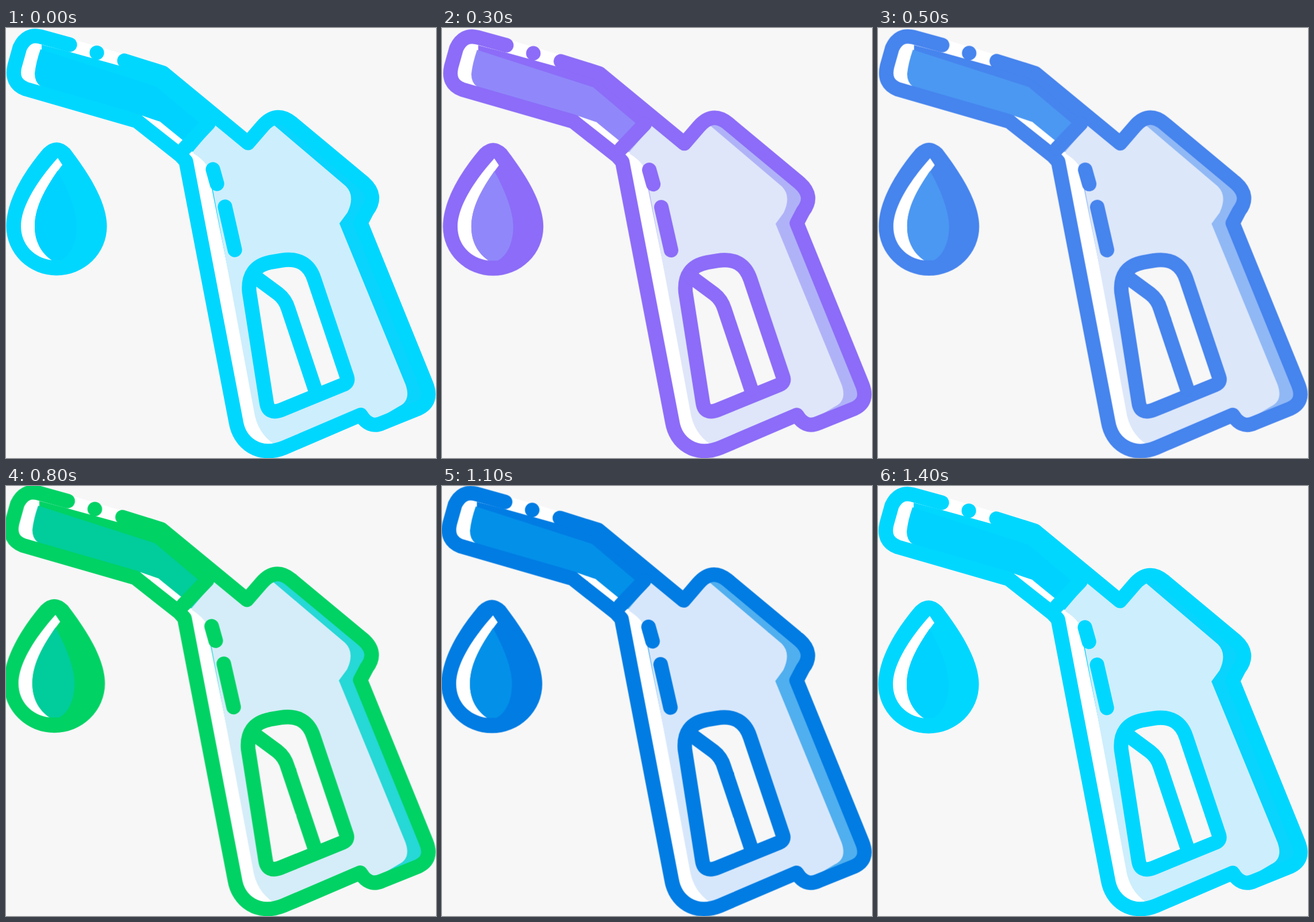
An HTML page that plays this animation: 748x748 px, repeating every 1.5 s.

```html
<!DOCTYPE html>
<html lang="en">
<head>
<meta charset="utf-8">
<title>Fuel nozzle</title>
<style>
  html, body { margin: 0; width: 100%; height: 100%; overflow: hidden; background: #f7f7f7; }
  svg { display: block; width: 100vw; height: 100vh; }

  .icon {
    transform-origin: 748px 748px;
    animation: recolor 1500ms step-end infinite;
  }
  .line { fill: none; stroke: var(--ink); stroke-width: 25.2; stroke-linecap: round; stroke-linejoin: round; }
  .ink { fill: var(--ink); }
  .fuel { fill: var(--fuel); }
  .body { fill: var(--body); }
  .shade { fill: var(--shade); }
  .white { fill: #fff; }
  .hole { fill: #f7f7f7; }

  @keyframes recolor {
    0%, 93.333%, 100% { --ink: #00d7ff; --fuel: #00d2ff; --body: #cdeefc; --shade: #08d4fd; transform: none; }
    13.333% { --ink: #46a1fb; --fuel: #48adfc; --body: #d6eafb; --shade: #5cc3fa; transform: none; }
    20%     { --ink: #8c6cf8; --fuel: #9088fa; --body: #dfe6f9; --shade: #b0b2f8; transform: scale(.9985); }
    33.333% { --ink: #4684ee; --fuel: #4b98f2; --body: #dce7fa; --shade: #90b8f5; transform: scale(.999); }
    40%     { --ink: #009be4; --fuel: #04a7e9; --body: #dae9fb; --shade: #70bef2; transform: none; }
    53.333% { --ink: #00d264; --fuel: #00cd9b; --body: #d5edf8; --shade: #26d8d6; transform: scale(1.006, 1.004); }
    73.333% { --ink: #007ce3; --fuel: #0390e9; --body: #d7e7fb; --shade: #50afef; transform: scale(1.002); }
    80%     { --ink: #00aaf1; --fuel: #02b1f4; --body: #d2ebfb; --shade: #2cc2f6; transform: scale(1.001); }
  }
</style>
</head>
<body>
<svg viewBox="0 0 748 748">
  <g class="icon">
    <!-- drop -->
    <path class="ink" d="M65 210Q88 188 111 210C146 256 175 303 175.5 345A87.5 85.5 0 0 1 .5 345C.5 301 30 251 65 210Z"/>
    <path class="white" d="M90 226L98 238C70 275 50 310 50 345C50 372 62 392 80 404C48 400 26 376 26 345C26 310 55 265 90 226Z"/>
    <path class="fuel" d="M90 248C68 280 50 312 50 345C50 372 62 392 80 404H96C113 395 123 372 123 345C123 315 105 275 90 248Z"/>

    <!-- spout -->
    <path class="white" d="M111 18L206 46V70L62 45L60 101L34 106L15 66L24 34L60 15Z"/>
    <path class="ink" d="M62 29L112 42L206 68L273 77L400 185L350 180L262 104L62 42Z"/>
    <path class="fuel" d="M60 37L262 102L345 172L310 204L268 163L228 155L60 101Q50 94 50 79Q52 60 60 37Z"/>
    <path class="white" d="M236 152L268 163L316 202L306 214Z"/>

    <!-- handle body -->
    <path class="shade" d="M313 220L365 165L421 200L470 160L497 164L622 269L637 295L617 339L731 620L717 662L640 690L617 673L484 730L440 735L400 685Z"/>
    <path class="white" d="M313 215H345L440 690L470 726H430L400 685Z"/>
    <path class="body" d="M326 214L365 168L421 206L465 168L591 275Q608 292 594 321L580 340L695 620Q705 648 684 658L640 684L617 673L475 729Q442 712 433 675L354 250Q350 233 326 218Z"/>

    <!-- outlines -->
    <g class="line">
      <path d="M111 29L60 15Q36 9 24 34L15 66Q8 96 34 106L228 162L304 222L313 232L400 685C406 722 440 748 484 730L617 673L622 680Q636 696 655 687L717 662Q743 650 731 620L617 339L628 318Q648 292 622 269L497 165Q470 143 446 171L421 200L273 78L206 57"/>
      <path d="M311 209L352 166M158 43h.01M360 246L367 271M381 311L398 386"/>
    </g>

    <!-- trigger -->
    <g class="line" transform="translate(-.8 -.8)">
      <path class="hole" d="M424 460L454 652Q457 674 480 665L588 621Q597 617 594 608L537 438Q524 398 480 405L462 408Q420 416 424 460Z"/>
      <path d="M432 432L474 463Q487 473 492 490L538 628"/>
    </g>
  </g>
</svg>
</body>
</html>
```
